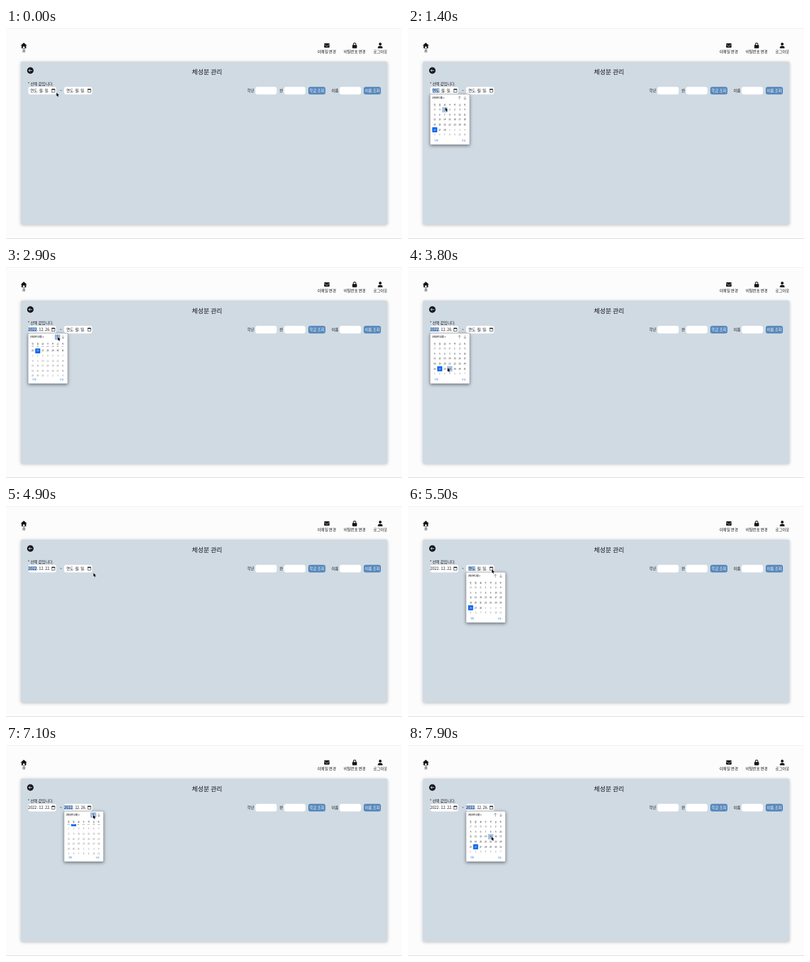
An HTML page with a canvas that plays this animation: 600x320 px, repeating every 8 s.

```html
<!DOCTYPE html>
<html lang="ko">
<head>
<meta charset="utf-8">
<style>
html, body { margin: 0; width: 100%; height: 100%; overflow: hidden; background: #fcfcfc; }
canvas { display: block; width: 600px; height: 320px; }
</style>
</head>
<body>
<canvas id="stage"></canvas>
<script>
const LOOP = 8000, STEP = 100;
const ROW = 7.6, SECOND_X = 54.4;
const FONT = '"Noto Sans CJK KR", "Noto Sans CJK", "Noto Sans", sans-serif';
const INK = '#14161a', BLUE = '#1067ec', HOVER = '#a9c8f0';

const canvas = document.getElementById('stage');
const ctx = canvas.getContext('2d');
const ratio = window.devicePixelRatio || 1;
canvas.width = 600 * ratio;
canvas.height = 320 * ratio;

// Pointer path: time, x, y
const path = [
  [0, 76.5, 98], [200, 72.5, 96], [900, 72.5, 96], [1400, 56.5, 120.5],
  [1800, 78.5, 106], [3300, 78.5, 106], [3800, 60, 153], [4200, 71, 147],
  [4400, 71, 147], [4900, 132.5, 101.5], [5100, 127, 96], [5700, 127, 96],
  [6100, 112, 121], [6400, 130.3, 109.4], [6600, 132, 106], [7600, 132, 106],
  [7900, 126.5, 139]
];

// Each picker: when it opens, closes, and when the two "previous month" clicks land
const pickers = [
  { dx: 0, open: 400, close: 4300, clicks: [2250, 2780], picked: '22' },
  { dx: SECOND_X, open: 5300, close: Infinity, clicks: [6680, 7040] }
];

// Month views: first visible week relative to 29 January 2023
const views = [
  { year: 2023, month: 1, week: 0 },
  { year: 2023, month: 0, week: -4 },
  { year: 2022, month: 11, week: -9 }
];

const clamp = v => Math.max(0, Math.min(1, v));
const ease = v => v * v * (3 - 2 * v);

function pointerAt(t) {
  const i = path.findIndex(p => p[0] > t);
  if (i < 0) return path[path.length - 1].slice(1);
  const a = path[i - 1], b = path[i];
  const k = ease((t - a[0]) / (b[0] - a[0]));
  return [a[1] + (b[1] - a[1]) * k, a[2] + (b[2] - a[2]) * k];
}

function text(s, x, y, size, weight = 500, color = INK, align = 'left') {
  ctx.font = `${weight} ${size}px ${FONT}`;
  ctx.textAlign = align;
  ctx.fillStyle = color;
  ctx.fillText(s, x, y + size * 0.36);
}

function box(x, y, w, h, r, color) {
  ctx.fillStyle = color;
  ctx.beginPath();
  ctx.roundRect(x, y, w, h, r);
  ctx.fill();
}

function poly(points, color = INK) {
  ctx.fillStyle = color;
  ctx.beginPath();
  points.forEach(([x, y]) => ctx.lineTo(x, y));
  ctx.closePath();
  ctx.fill();
}

function stroke(points, color, width) {
  ctx.strokeStyle = color;
  ctx.lineWidth = width;
  ctx.beginPath();
  points.forEach(([x, y], i) => i ? ctx.lineTo(x, y) : ctx.moveTo(x, y));
  ctx.stroke();
}

function disc(x, y, r, color = INK) {
  ctx.fillStyle = color;
  ctx.beginPath();
  ctx.arc(x, y, r, 0, Math.PI * 2);
  ctx.fill();
}

function withShadow(color, blur, dy, draw) {
  ctx.save();
  ctx.shadowColor = color;
  ctx.shadowBlur = blur * ratio;
  ctx.shadowOffsetY = dy * ratio;
  draw();
  ctx.restore();
}

function drawIcons() {
  // home
  poly([[27, 22.2], [31.7, 26.6], [30.5, 26.6], [30.5, 30.8], [28.2, 30.8], [28.2, 28],
    [25.8, 28], [25.8, 30.8], [23.5, 30.8], [23.5, 26.6], [22.3, 26.6]]);
  // envelope
  box(482, 23.3, 8.2, 6.4, 1, INK);
  stroke([[482, 24.9], [486.1, 27.8], [490.2, 24.9]], '#fcfcfc', 0.6);
  // lock
  box(524.7, 25.8, 7, 5, 1, INK);
  ctx.strokeStyle = INK;
  ctx.lineWidth = 1.1;
  ctx.beginPath();
  ctx.moveTo(526.3, 26);
  ctx.lineTo(526.3, 24.8);
  ctx.arc(528.2, 24.8, 1.9, Math.PI, 0);
  ctx.lineTo(530.1, 26);
  ctx.stroke();
  // user
  disc(567, 24.4, 2.1);
  box(563.4, 27.3, 7.2, 3.4, [3, 3, 0.6, 0.6], INK);
}

function drawPage() {
  ctx.fillStyle = '#fcfcfc';
  ctx.fillRect(0, 0, 600, 320);
  ctx.fillStyle = '#ececec';
  ctx.fillRect(0, 0, 600, 0.7);
  ctx.fillStyle = '#dedede';
  ctx.fillRect(0, 319, 600, 1);

  drawIcons();
  text('홈', 27, 34.2, 5.7, 500, INK, 'center');
  text('이메일 변경', 486, 35.8, 5.8, 500, INK, 'center');
  text('비밀번호 변경', 528.3, 35.8, 5.8, 500, INK, 'center');
  text('로그아웃', 567.2, 35.8, 5.7, 500, INK, 'center');

  withShadow('rgba(0,0,0,.25)', 5, 1, () => box(22.7, 51, 555, 247, 1.5, '#d0dae3'));
  disc(36.9, 64.5, 4.9);
  stroke([[39.6, 64.5], [34.4, 64.5]], '#d0dae3', 0.9);
  stroke([[36.7, 62.2], [34.4, 64.5], [36.7, 66.8]], '#d0dae3', 0.9);
  text('체성분 관리', 304.7, 66.5, 9.5, 500, INK, 'center');
  text('* 선택 값입니다.', 33, 85, 5.8);
  text('~', 83.2, 94.6, 5.8, 500, INK, 'center');

  text('학년', 365.6, 94.7, 5.7);
  text('반', 414.6, 94.7, 5.7);
  text('이름', 493.3, 94.7, 5.7);
  [377.8, 421.3, 505.4].forEach(x => box(x, 89.2, 32.4, 11.6, 3.2, '#fff'));
  [[458, '학급 조회'], [542, '이름 조회']].forEach(([x, label]) => {
    box(x, 89.2, 26, 11.6, 3.2, '#5587ba');
    text(label, x + 13, 94.8, 5.8, 500, '#fff', 'center');
  });
}

function drawField(picker, t) {
  const { dx, open, close, clicks, picked } = picker;
  const clicked = clicks.filter(c => t >= c).length;
  const focused = t >= open && !(dx === 0 && t >= pickers[1].open);
  box(33.7 + dx, 89.2, 42.4, 11.6, 3.2, '#fff');
  if (focused) {
    const [x, w] = clicked ? [33.5, 13.6] : [36.6, 11.2];
    box(x + dx, 91.2, w, 6.8, 0.8, '#a9cbf7');
  }
  const parts = clicked
    ? [[33.6, views[clicked].year + '.'], [50, ('0' + (views[clicked].month + 1)).slice(-2) + '.'],
       [59.2, (t >= close ? picked : '26') + '.']]
    : [[37, '연도.'], [50.3, '월.'], [58.6, '일.']];
  parts.forEach(([x, s]) => text(s, x + dx, 94.7, 5.8));

  ctx.strokeStyle = INK;
  ctx.lineWidth = 0.6;
  ctx.strokeRect(69.6 + dx, 92.9, 4.4, 4.3);
  ctx.fillStyle = INK;
  ctx.fillRect(69.4 + dx, 92.4, 4.8, 1.3);
}

function drawCells(picker, view, week, px, py) {
  const left = 36.7, top = 120.2;
  ctx.save();
  ctx.beginPath();
  ctx.rect(34, top - 0.3, 59, 47.2);
  ctx.clip();
  const first = Math.floor(week);
  for (let r = 0; r < 7; r++) {
    const y = top + (first + r - week) * ROW;
    for (let c = 0; c < 7; c++) {
      const x = left + c * ROW;
      const date = new Date(Date.UTC(2023, 0, 29 + 7 * (first + r) + c));
      const day = date.getUTCDate();
      const current = date.getUTCMonth() === view.month;
      const selected = current && day === 26;
      const hovered = px >= x && px < x + ROW && py >= y && py < y + ROW && py >= top && py < 166;
      if (selected || hovered) box(x, y, ROW, ROW, 0.7, selected ? BLUE : HOVER);
      if (hovered && !selected) {
        ctx.strokeStyle = '#8ba5c6';
        ctx.lineWidth = 0.4;
        ctx.strokeRect(x + 0.2, y + 0.2, ROW - 0.4, ROW - 0.4);
      }
      const color = selected ? '#fff' : current ? '#111' : '#777';
      text(String(day), x + ROW / 2, y + ROW / 2 + 0.1, 3.1, current ? 500 : 400, color, 'center');
    }
  }
  ctx.restore();
}

function drawArrow(x, dir) {
  stroke([[x, 103.8], [x, 108.5]], '#444', 0.5);
  const tip = 106.1 + dir * 2.4;
  stroke([[x - 2, tip - dir * 2], [x, tip], [x + 2, tip - dir * 2]], '#444', 0.5);
}

function drawCalendar(picker, t, pointer) {
  const { dx, open, close, clicks } = picker;
  if (t < open || t >= close + 200) return;
  const alpha = t < close ? clamp((t - open + 150) / 300) : clamp(1 - (t - close) / 200);
  const view = views[clicks.filter(c => t >= c).length];
  let week = 0;
  clicks.forEach((c, i) => {
    week += (views[i + 1].week - views[i].week) * ease(clamp((t - c) / 340));
  });
  const px = pointer[0] - dx, py = pointer[1];

  ctx.save();
  ctx.globalAlpha = alpha;
  ctx.translate(dx, 0);
  withShadow('rgba(0,0,0,.5)', 5, 1.5, () => box(33.5, 100.2, 60, 76.8, 0.8, '#fff'));
  ctx.strokeStyle = '#8d949b';
  ctx.lineWidth = 0.5;
  ctx.strokeRect(33.6, 100.3, 59.8, 76.6);

  const title = `${view.year}년 ${view.month + 1}월`;
  text(title, 36.8, 106.2, 3.1, 700);
  const end = 36.8 + ctx.measureText(title).width + 1;
  poly([[end, 105.6], [end + 1.9, 105.6], [end + 0.95, 106.9]], '#333');

  if (px >= 74 && px < 82 && py >= 102.6 && py < 109.3) {
    box(74.1, 102.7, 7.8, 7.2, 0.8, HOVER);
    ctx.strokeStyle = '#5f7fa8';
    ctx.strokeRect(74.3, 102.9, 7.4, 6.8);
  }
  drawArrow(78, -1);
  drawArrow(86.3, 1);

  [...'일월화수목금토'].forEach((s, i) =>
    text(s, 40.5 + i * ROW, 116.4, 3.1, 500, '#222', 'center'));
  drawCells(picker, view, week, px, py);
  text('삭제', 42.7, 170.7, 3.1, 500, BLUE, 'center');
  text('오늘', 84.4, 170.7, 3.1, 500, BLUE, 'center');
  ctx.restore();
}

function drawPointer([x, y]) {
  ctx.save();
  ctx.translate(x, y);
  ctx.beginPath();
  [[0, 0], [0, 5.6], [1.3, 4.4], [2.2, 6.5], [3.2, 6.1], [2.3, 4], [4, 4]]
    .forEach(([a, b]) => ctx.lineTo(a, b));
  ctx.closePath();
  ctx.strokeStyle = '#fff';
  ctx.lineWidth = 0.8;
  ctx.stroke();
  ctx.fillStyle = '#000';
  ctx.fill();
  ctx.restore();
}

function render(t) {
  const pointer = pointerAt(t);
  ctx.setTransform(ratio, 0, 0, ratio, 0, 0);
  drawPage();
  pickers.forEach(p => drawField(p, t));
  pickers.forEach(p => drawCalendar(p, t, pointer));
  drawPointer(pointer);
}

let start;
function tick(now) {
  start ??= now;
  render(Math.floor(((now - start) % LOOP) / STEP) * STEP);
  requestAnimationFrame(tick);
}
render(0);
requestAnimationFrame(tick);
</script>
</body>
</html>
```
